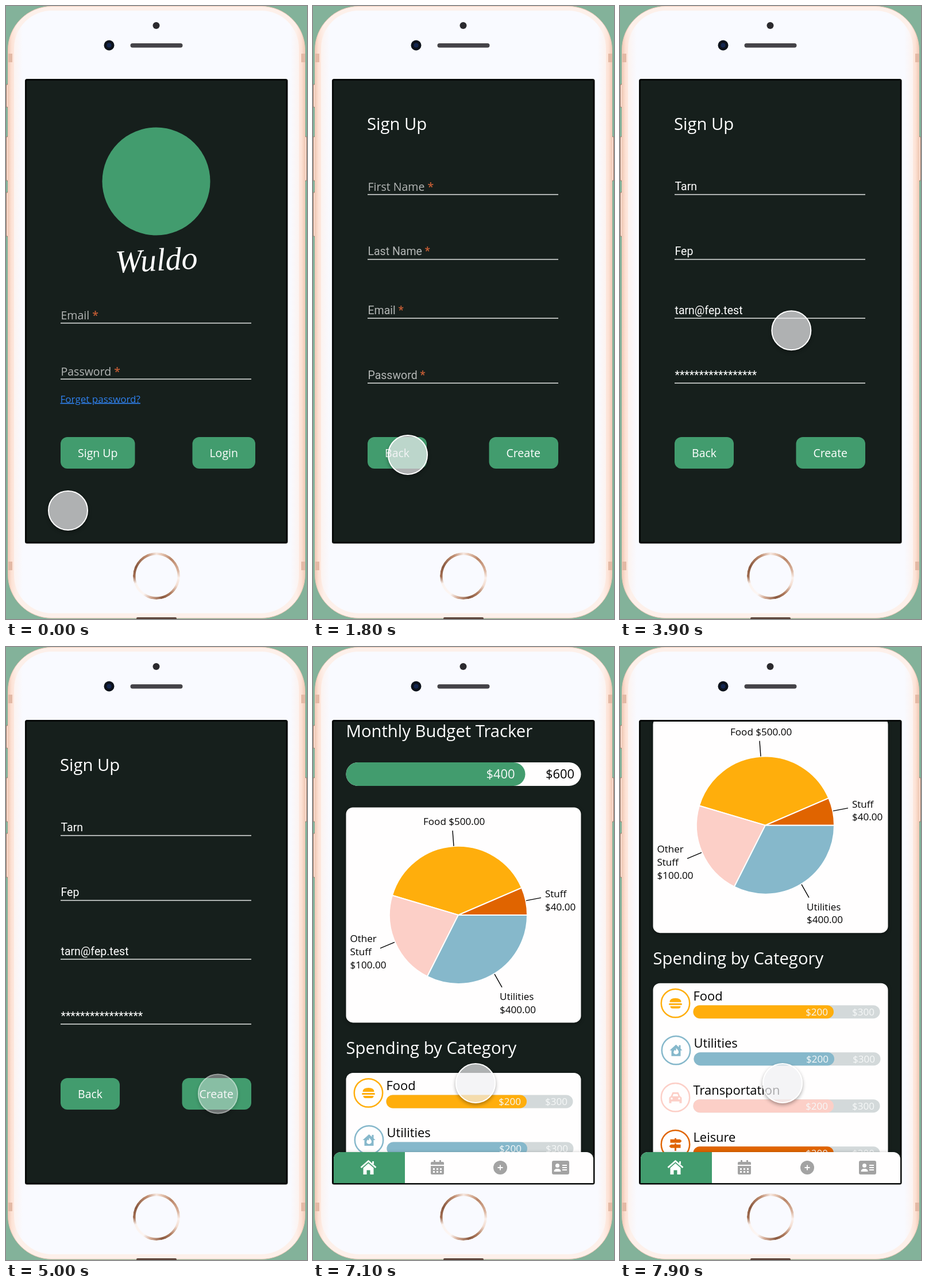
An HTML page for the animation above (8000 ms loop, 524 px wide and 1068 px high).

```html
<!DOCTYPE html>
<html lang="en">
<head>
<meta charset="utf-8">
<style>
  html, body { margin: 0; width: 524px; height: 1068px; overflow: hidden; background: #83b29a; }
  svg { position: absolute; left: 0; top: 0; }
  text { font-family: "Open Sans", sans-serif; font-size: 19.5px; fill: #fff; white-space: pre; }
  .roboto { font-family: Roboto, sans-serif; }
  .heading { font-size: 29.25px; }
  .medium { font-size: 21.9px; }
  .small { font-size: 17.06px; }
  .label { fill: #b4b7b6; }
  .star { fill: #c25c34; font-weight: 600; }
  .dark { fill: #000; }
  .soft { fill: #f6f8f8; }
  .brand { font: italic 56px "Liberation Serif", serif; }
  .card { fill: #fffefe; filter: drop-shadow(0 2px 3px #0006); }
  #ring {
    position: absolute; left: 220.5px; top: 952px; width: 82px; height: 82px; border-radius: 50%;
    background: conic-gradient(#f7e9e2, #e9cbb9 12deg, #b98467 40deg, #d9b29c 75deg, #fbf1ec 95deg,
      #f3ddd1 115deg, #b17d60 140deg, #8a5a41 165deg, #d3aa94 195deg, #fcf6f4 215deg, #fbf3ef 250deg,
      #a26d51 268deg, #8a5a41 295deg, #c08e72 335deg, #f7e9e2);
    -webkit-mask: radial-gradient(circle, #0000 36px, #000 37px);
    mask: radial-gradient(circle, #0000 36px, #000 37px);
  }
  #cursor {
    position: absolute; left: -35px; top: -35px; width: 70px; height: 70px; box-sizing: border-box;
    border: 2px solid #fff; border-radius: 50%;
    background: rgba(240, 240, 243, .7); box-shadow: 0 3px 6px #0005;
  }
</style>
</head>
<body>
<svg width="524" height="1068" viewBox="0 0 524 1068">
  <defs>
    <linearGradient id="rim">
      <stop stop-color="#f1cab6"/><stop offset=".012" stop-color="#fde2d5"/>
      <stop offset=".03" stop-color="#fdf0ea"/><stop offset=".97" stop-color="#fdf0ea"/>
      <stop offset=".988" stop-color="#fde2d5"/><stop offset="1" stop-color="#f1cab6"/>
    </linearGradient>
    <linearGradient id="glass">
      <stop stop-color="#fcf3f0"/><stop offset=".03" stop-color="#f9faff"/>
      <stop offset=".97" stop-color="#f9faff"/><stop offset="1" stop-color="#fcf3f0"/>
    </linearGradient>
    <clipPath id="screen"><path d="M36 130H488V934H36Z"/></clipPath>
  </defs>

  <g fill="#f8dccf" stroke="#8f6e5d">
    <rect x=".5" y="136" width="8" height="41" rx="3"/>
    <rect x=".5" y="227" width="8" height="78" rx="3"/>
    <rect x=".5" y="324" width="8" height="78" rx="3"/>
    <rect x="515.500" y="227" width="8" height="78" rx="3"/>
  </g>
  <rect x="3.500" y=".5" width="517" height="1066" rx="76" fill="url(#rim)" stroke="#f0cab8"/>
  <path d="M4 83h7v15H4zM514 83h7v15h-7zM4 968h7v15H4zM514 968h7v15h-7z" fill="#e3b9a5"/>
  <rect x="14" y="8" width="496" height="1050" rx="66" fill="url(#glass)"/>
  <rect x="227" y="1065" width="70" height="6" rx="2" fill="#5d463c"/>
  <circle cx="261.500" cy="34" r="6" fill="#2b2a2e"/>
  <circle cx="179.500" cy="68.500" r="9" fill="#0d121b"/>
  <circle cx="179.500" cy="68.500" r="4" fill="#14264f"/>
  <rect x="216.500" y="65" width="91" height="7.500" rx="3.700" fill="#454348"/>
  <rect x="34.500" y="128.500" width="454.500" height="806.500" rx="2" fill="#161f1c" stroke="#060908" stroke-width="3"/>

  <g id="login"></g>
  <g id="signup"></g>
  <g id="dashboard" clip-path="url(#screen)">
    <g id="page"></g>
    <path d="M36 934V892a12 12 0 0 1 12-12H476a12 12 0 0 1 12 12V934Z" class="card"/>
    <path d="M36 934V892a12 12 0 0 1 12-12H160V934Z" fill="#429c6e"/>
    <path d="M83.500 907 96.500 895.500 109.500 907M104.500 896v5" fill="none" stroke="#fff" stroke-width="2.800"/>
    <path d="M87.500 907.500 96.500 899.500 105.500 907.500V919H99.500V911.500H93.500V919H87.500Z" fill="#fff"/>
    <g fill="#a3a3a3">
      <path d="M205 902v-3q0-2 2-2h3v-3h3v3h7v-3h3v3h3q2 0 2 2v3zM205 904h23v13q0 2-2 2h-19q-2 0-2-2z"/>
      <circle cx="326" cy="907" r="12"/>
      <rect x="416" y="895" width="30" height="24" rx="3"/>
    </g>
    <path d="M209 909.500h15M209 914.500h15" stroke="#fff" stroke-width="3" stroke-dasharray="3"/>
    <path d="M321.500 907h9M326 902.500v9M434 903h8M434 907h8M434 911h8" stroke="#fff" stroke-width="1.800"/>
    <circle cx="425.500" cy="903.500" r="3.500" fill="#fff"/>
    <path d="M419.500 914q0-5 6-5t6 5z" fill="#fff"/>
  </g>
</svg>
<div id="ring"></div>
<div id="cursor"></div>

<script>
const $ = id => document.getElementById(id);
const GREEN = '#429c6e', YELLOW = '#ffae0c', BLUE = '#86b8cb', PINK = '#fccfc7', ORANGE = '#e06400';

const text = (x, y, s, cls = '') => `<text x="${x}" y="${y}" class="${cls}">${s}</text>`;
const pill = (x, y, w, h, fill) =>
  `<rect x="${x}" y="${y}" width="${w}" height="${h}" rx="${h / 2}" fill="${fill}"/>`;
const line = y => `<path d="M95 ${y}H427" stroke="#e4e7e6" stroke-width="1.500"/>`;
const label = (y, s, cls = '') =>
  text(95.5, y, `${s} <tspan class="star">*</tspan>`, 'label ' + cls);
const button = (x, w, s) =>
  `<rect x="${x}" y="751" width="${w}" height="55" rx="12" fill="${GREEN}"/>` + text(x + 30, 786, s);

$('login').innerHTML =
  `<circle cx="261.500" cy="305.500" r="94" fill="${GREEN}"/>
   <text x="262" y="461" class="brand" text-anchor="middle" transform="rotate(-3 262 445)">Wuldo</text>` +
  label(546, 'Email') + line(552.5) + label(643.5, 'Password') + line(650) +
  `<text x="94.500" y="690.500" class="small" style="fill:#2f80ed" text-decoration="underline">Forget password?</text>` +
  button(95, 129.5, 'Sign Up') + button(324.5, 109.5, 'Login');

$('signup').innerHTML = text(94, 216, 'Sign Up', 'heading') +
  [328.5, 441.5, 544, 657].map(line).join('') +
  '<g id="empty">' + label(322, 'First Name') + label(434, 'Last Name', 'roboto') +
  label(536.5, 'Email', 'roboto') + label(649.5, 'Password', 'roboto') + '</g><g id="filled">' +
  text(95.5, 321, 'Tarn', 'roboto') + text(95.5, 434, 'Fep', 'roboto') +
  text(95.5, 536.5, 'tarn@fep.test', 'roboto') + text(95.5, 649.5, '*'.repeat(17), 'roboto') + '</g>' +
  button(95, 103, 'Back') + button(306.5, 120.5, 'Create');

function slice(from, to, fill) {
  const at = deg => {
    const a = deg * Math.PI / 180;
    return `${253 + 120 * Math.cos(a)} ${500 - 120 * Math.sin(a)}`;
  };
  return `<path d="M253 500L${at(from)}A120 120 0 0 0 ${at(to)}Z" fill="${fill}" stroke="#fff" stroke-width="2"/>`;
}
const note = (x, y, ...lines) =>
  lines.map((s, i) => text(x, y + i * 22.8, s, 'small dark')).join('');

// Icons are drawn around the centre of their ring.
const icons = {
  burger: c => `<path d="M-10-2q0-7 10-7t10 7zM-9 5H9q0 4-4 4H-5q-4 0-4-4z" fill="${c}"/>
    <path d="M-10 1.500H10" stroke="${c}" stroke-width="3" stroke-linecap="round"/>`,
  house: c => `<path d="M-11 0 0-10 5-5.500V-9H8V-3L11 0H8V10H-8V0Z" fill="${c}"/>
    <path d="M0-4q6 5 4 9-4 4-8 0-1-3 2-6l1 2q2-2 1-5z" fill="#fff"/>`,
  car: c => `<path d="M-8-2-5-9H5L8-2Q11-1 11 2V10H7V7H-7V10H-11V2q0-3 3-4z" fill="${c}"/>
    <path d="M-5-2-3.500-6H3.500L5-2Z" fill="#fff"/>
    <path d="M-8 2h3M5 2h3" stroke="#fff" stroke-width="3"/>`,
  signs: c => `<path d="M-1.500-11h3V-9H8l3 3-3 3H-9V-9h7.500zM-1.500-2h3V0H9V6H1.500v5h-3V6H-8l-3-3 3-3h6.500z" fill="${c}"/>`
};

const row = ([name, color, icon], i) =>
  `<g transform="translate(${i === 1 ? 1 : 0} ${i * 82})">
     <g transform="translate(96.500 810)"><circle r="24.700" fill="none" stroke="${color}" stroke-width="2.500"/>${icons[icon](color)}</g>` +
  text(127.5, 805, name, 'medium dark') +
  pill(127.5, 813.5, 325, 23, '#d3d9da') + pill(127.5, 813.5, 244.5, 23, color) +
  text(323, 831, '$200', 'small soft') + text(404, 831, '$300', 'small soft') + '</g>';

$('page').innerHTML = text(57.5, 190, 'Monthly Budget Tracker', 'heading') +
  pill(57.5, 234, 409, 41, '#fffefe') + pill(57.5, 234, 312, 41, GREEN) +
  text(301.5, 262, '$400', 'medium soft') + text(405, 262, '$600', 'medium dark') +
  '<rect x="57.500" y="312.500" width="409" height="375" rx="12" class="card"/>' +
  slice(0, 23.3, ORANGE) + slice(23.3, 163.5, YELLOW) + slice(163.5, 243.2, PINK) + slice(243.2, 360, BLUE) +
  '<path d="M243 353l2 27M397 470l-26 5M117 558l25-10.500M329 626l-13-23" stroke="#000" stroke-width="1.400"/>' +
  note(192, 343.5, 'Food $500.00') + note(404, 469, 'Stuff', '$40.00') +
  note(64.5, 547.5, 'Other', 'Stuff', '$100.00') + note(325, 648, 'Utilities', '$400.00') +
  text(57.5, 742, 'Spending by Category', 'heading') +
  '<rect x="57.500" y="775" width="409" height="430" rx="12" class="card"/>' +
  [['Food', YELLOW, 'burger'], ['Utilities', BLUE, 'house'],
   ['Transportation', PINK, 'car'], ['Leisure', ORANGE, 'signs']].map(row).join('');

const LOOP = 8000, SIGNUP = 1250, FILL = 3050, HOME = 5150;
// Cursor moves: start, end, target x, target y.
const moves = [
  [300, 950, 165, 782],
  [1800, 2600, 217, 320],
  [3273, 4473, 369, 778.5],
  [5400, 6100, 283, 760]
];
const presses = [[1000, SIGNUP], [2800, FILL], [4800, HOME]];

const clamp = v => Math.min(1, Math.max(0, v));
const ease = p => p * p * (3 - 2 * p);
const show = (id, on) => $(id).style.display = on ? '' : 'none';

function render(t) {
  show('login', t < SIGNUP);
  show('signup', t >= SIGNUP && t < HOME);
  show('dashboard', t >= HOME);
  show('empty', t < FILL);
  show('filled', t >= FILL);

  const scroll = 33 * (Math.max(0, t - 6526) / 574) ** 2;
  $('page').setAttribute('transform', `translate(0 ${-scroll})`);

  let x = 108, y = 879;
  for (const [start, end, tx, ty] of moves) {
    const p = ease(clamp((t - start) / (end - start)));
    x += (tx - x) * p;
    y += (ty - y) * p;
  }
  const pressed = Math.max(...presses.map(([a, b]) => clamp((t - a) / 100) * clamp((b + 100 - t) / 100)));
  $('cursor').style.transform = `translate(${x}px, ${y}px)`;
  $('cursor').style.opacity = 1 - .42 * pressed;
}

function tick() {
  render(performance.now() % LOOP);
  requestAnimationFrame(tick);
}
tick();
</script>
</body>
</html>
```
